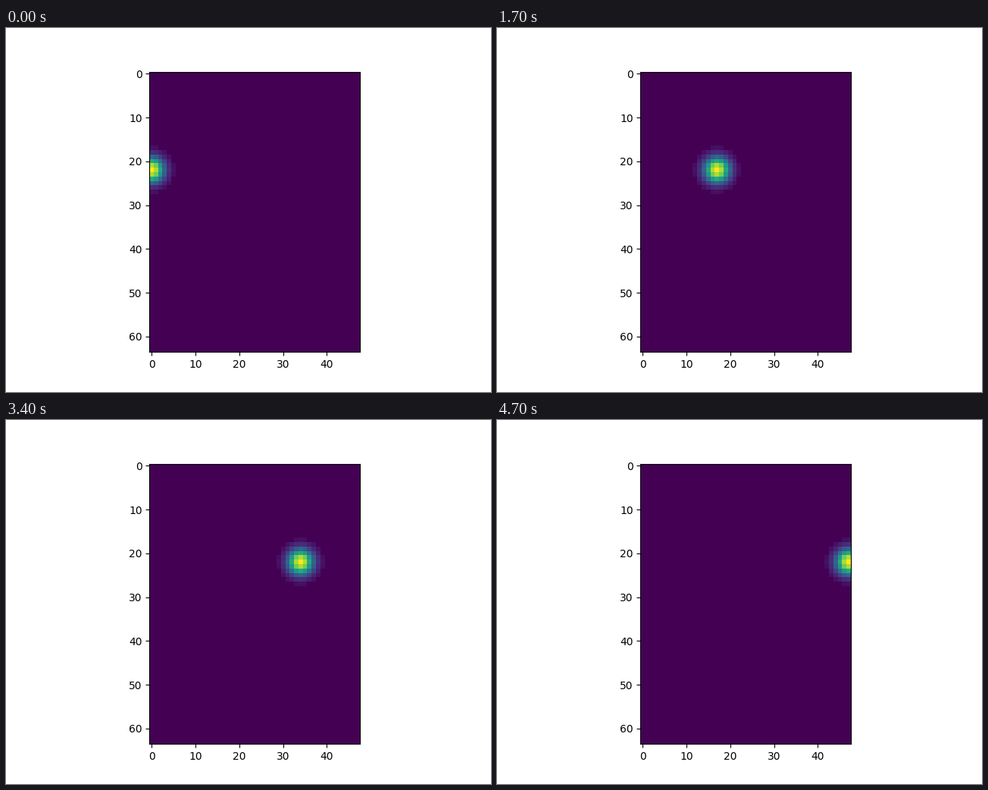
Recreate the animation shown at these times as a matplotlib script. Size 640 by 480 pixels, loop 4.8 s.

```python
import numpy as np
import matplotlib.pyplot as plt
from matplotlib.animation import FuncAnimation

ROWS, COLS = 64, 48
CENTER_Y = 22
SIGMA = 2
FLOOR = 0.03  # fainter values fade into the background

yy, xx = np.mgrid[:ROWS, :COLS]


def heatmap(cx):
    """Gaussian blob with peak 1 centred on column cx."""
    r2 = (xx - cx) ** 2 + (yy - CENTER_Y) ** 2
    blob = np.exp(-r2 / (2 * SIGMA ** 2))
    return np.where(blob < FLOOR, 0, blob)


fig, ax = plt.subplots(figsize=(6.4, 4.8), dpi=100)
image = ax.imshow(heatmap(0), cmap="viridis", vmin=0, vmax=1,
                  interpolation="nearest")


def update(step):
    image.set_data(heatmap(step % COLS))
    return (image,)


anim = FuncAnimation(fig, update, frames=COLS, interval=100,
                     repeat=True, repeat_delay=0, blit=False)

plt.show()
```
